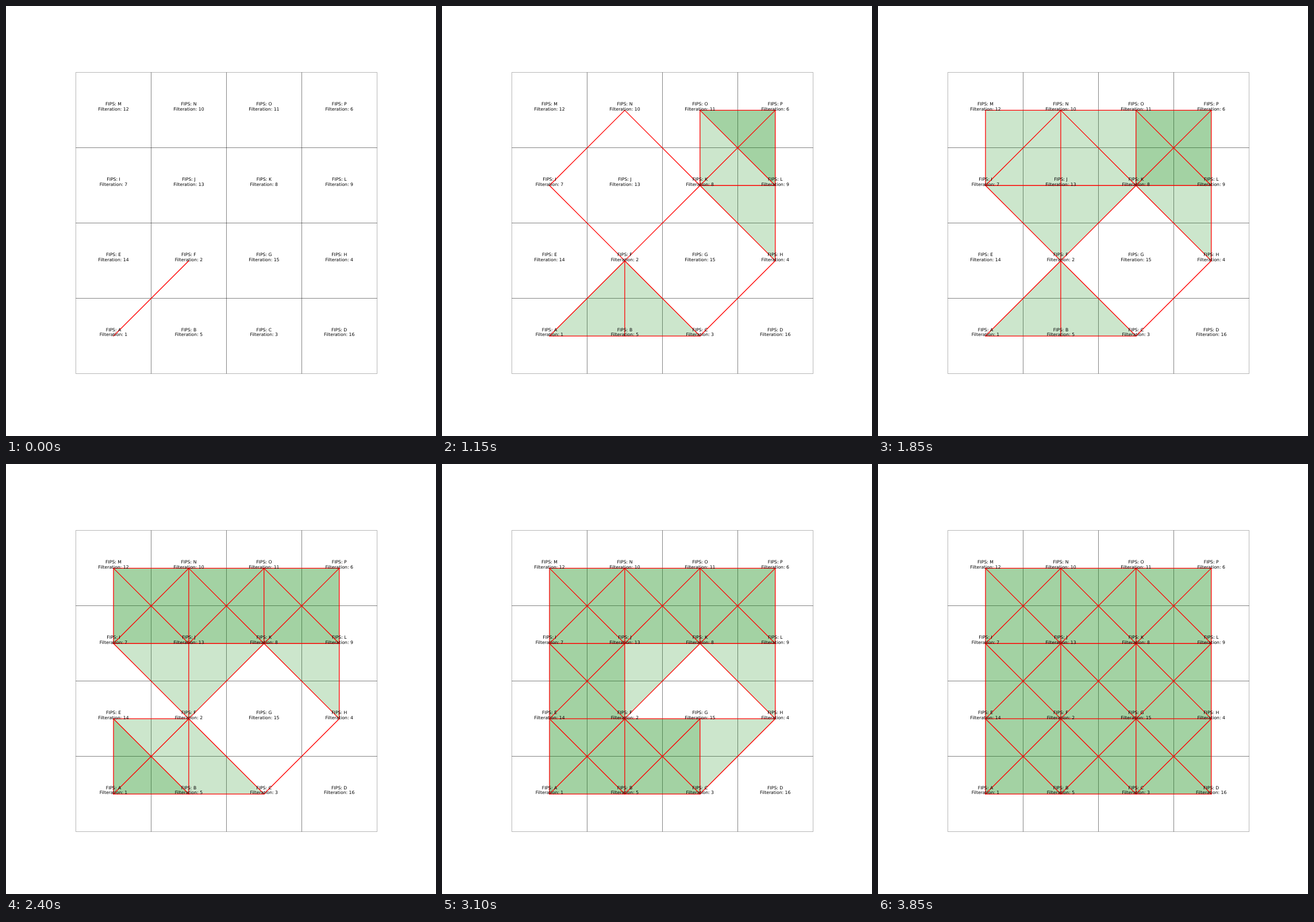
An HTML page with a canvas for the animation above (3.9 s loop, 748 by 748 pixels).

```html
<!DOCTYPE html>
<html lang="en">
<head>
<meta charset="utf-8">
<title>Simplicial filtration on a grid</title>
<style>
  html, body { margin: 0; width: 100%; height: 100%; overflow: hidden; background: #fff; }
  canvas { display: block; }
</style>
</head>
<body>
<canvas id="stage" width="748" height="748"></canvas>
<script>
const ctx = document.getElementById('stage').getContext('2d');
const SIZE = 748, STEP_MS = 50;
const LEFT = 121.55, TOP = 115.92, CELL = 130.9;
const ROWS = ['MNOP', 'IJKL', 'EFGH', 'ABCD'];
const ORDER = 'AFCHBPIKLNOMJEGD'; // vertices by filtration value

const vertices = [...ORDER].map((name, i) => {
  const row = ROWS.findIndex(r => r.includes(name));
  const col = ROWS[row].indexOf(name);
  return {
    name, row, col, value: i + 1,
    x: LEFT + (col + 0.5) * CELL,
    y: TOP + (row + 0.5) * CELL
  };
});

const adjacent = (a, b) =>
  Math.max(Math.abs(a.row - b.row), Math.abs(a.col - b.col)) === 1;

// Each new vertex brings its edges, each followed by the triangles it closes.
function buildSimplices() {
  const list = [];
  vertices.forEach((v, i) => {
    const near = vertices.slice(0, i).filter(u => adjacent(u, v));
    near.forEach((u, j) => {
      list.push([v, u]);
      near.slice(0, j).filter(w => adjacent(w, u)).forEach(w => list.push([v, u, w]));
    });
  });
  return list;
}

const simplices = buildSimplices();

function trace(points) {
  ctx.beginPath();
  points.forEach(p => ctx.lineTo(p.x, p.y));
}

function drawGrid() {
  const snap = n => Math.floor(n) + 0.5;
  ctx.strokeStyle = 'rgba(0, 0, 0, 0.28)';
  ctx.lineWidth = 1;
  for (const { row, col } of vertices) {
    const x = snap(LEFT + col * CELL), y = snap(TOP + row * CELL);
    const right = snap(LEFT + (col + 1) * CELL), bottom = snap(TOP + (row + 1) * CELL);
    ctx.strokeRect(x, y, right - x, bottom - y);
  }
}

function drawLabels() {
  ctx.fillStyle = '#000';
  ctx.font = '7.7px "DejaVu Sans", sans-serif';
  ctx.textAlign = 'center';
  ctx.textBaseline = 'alphabetic';
  for (const v of vertices) {
    ctx.fillText('FIPS: ' + v.name, v.x, v.y - 8.3);
    ctx.fillText('Filteration: ' + v.value, v.x, v.y + 0.4);
  }
}

function draw(count) {
  const shown = simplices.slice(0, count);
  ctx.fillStyle = '#fff';
  ctx.fillRect(0, 0, SIZE, SIZE);
  drawGrid();

  ctx.fillStyle = 'rgba(0, 128, 0, 0.2)';
  for (const s of shown.filter(s => s.length === 3)) {
    trace(s);
    ctx.fill();
  }

  ctx.strokeStyle = '#f00';
  ctx.lineWidth = 1.3;
  ctx.lineCap = 'square';
  for (const s of shown.filter(s => s.length === 2)) {
    trace(s);
    ctx.stroke();
  }
  drawLabels();
}

const start = performance.now();
function tick() {
  const elapsed = performance.now() - start;
  draw(Math.floor(elapsed / STEP_MS) % simplices.length + 1);
  requestAnimationFrame(tick);
}
tick();
</script>
</body>
</html>
```
